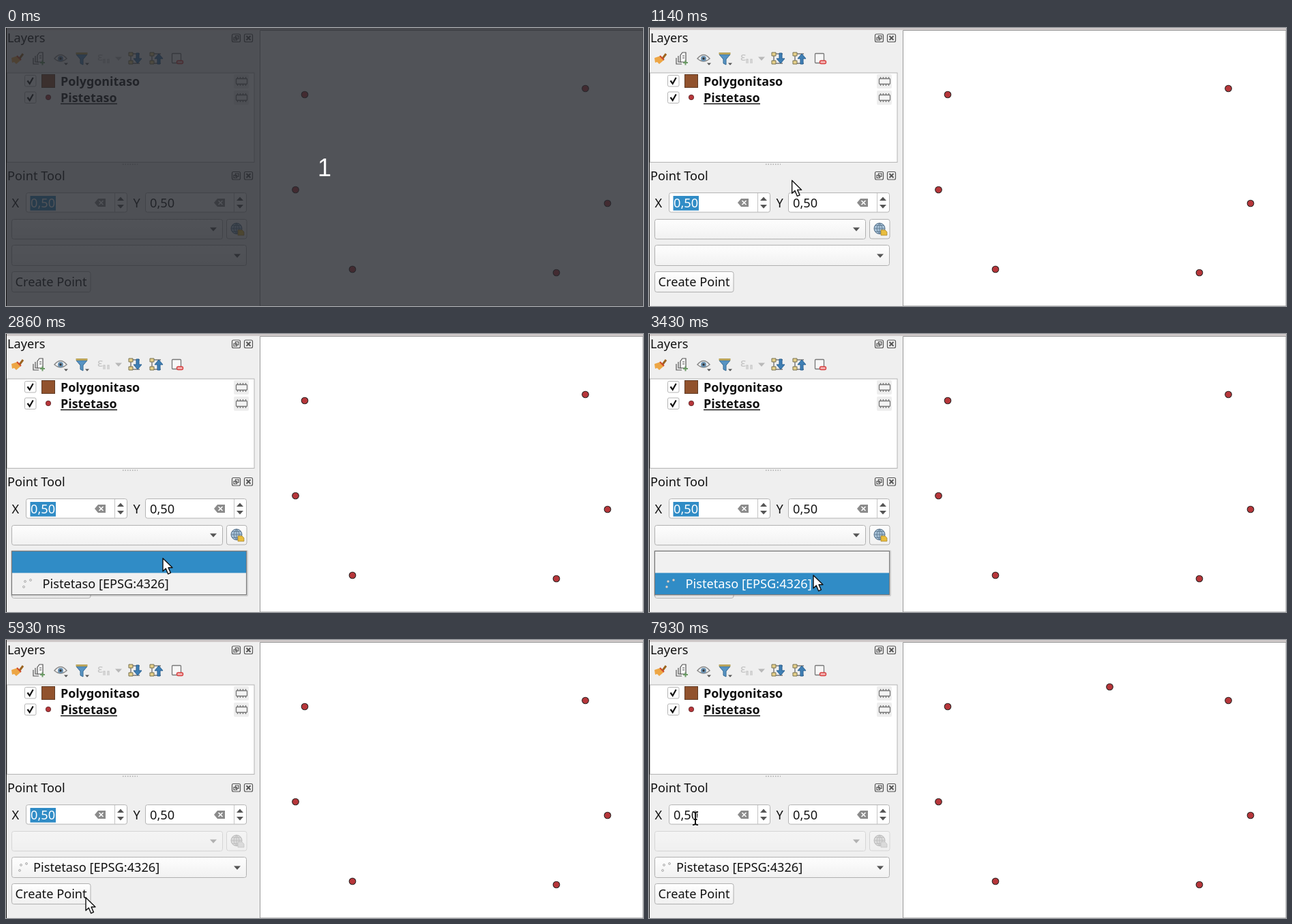
Write an HTML page that moves like this. It is 934x409 px and loops after 8 s.

```html
<!DOCTYPE html>
<html lang="fi">
<head>
<meta charset="utf-8">
<title>Point Tool</title>
<style>
  html, body { margin: 0; width: 100%; height: 100%; overflow: hidden; background: #efefef; }
  svg { display: block; width: 100%; height: 100%; }
  text { font: 18.2px "Noto Sans", sans-serif; fill: #111; }
  .bold { font-weight: 700; font-size: 17.9px; }
  .frame { fill: #fff; stroke: #b4b4b4; }
  .button { fill: url(#face); stroke: #b0b0b0; }
  .line { fill: none; stroke: #555; stroke-width: 1.2; }
  .arrow { fill: #555; }
  .disabled { opacity: .4; filter: grayscale(1); }
  .blue { fill: #308cc6; }
</style>
</head>
<body>
<svg viewBox="0 0 934 409" preserveAspectRatio="none">
  <defs>
    <linearGradient id="face" x2="0" y2="1">
      <stop stop-color="#fefefe"/><stop offset="1" stop-color="#f1f1f1"/>
    </linearGradient>
    <path id="down" class="arrow" d="M-5-2.5H5L0 3Z"/>
    <g id="dock" class="line">
      <rect x="331.5" y="9" width="12" height="11.5" rx="2"/>
      <path d="M336.5 11.5h4.5v4.5h-4.5zM334 14h4.5v4H334z"/>
      <rect x="349.5" y="9" width="12" height="11.5" rx="2"/>
      <path stroke-width="2" d="m352.5 11.8 6 6m0-6-6 6"/>
    </g>
    <g id="check">
      <rect class="frame" x="27.5" y="69.5" width="16.5" height="16.5" rx="2"/>
      <path d="m31.5 77.5 3.2 4.5 5-9" fill="none" stroke="#111" stroke-width="2.2"/>
    </g>
    <g id="memory">
      <rect x="334" y="68" width="22" height="21" rx="2" fill="#eee"/>
      <path d="M339.500 72v13m4-13v13m4-13v13m4-13v13" stroke="#777" stroke-width="1.3"/>
      <rect x="337.5" y="74.5" width="16" height="8" rx="1" fill="#f4f4f4" stroke="#777" stroke-width="1.3"/>
    </g>
    <g id="spin">
      <rect class="frame" x=".5" y="242.5" width="148" height="28.5" rx="3"/>
      <path d="M130.5 243v28" stroke="#c4c4c4"/>
      <path d="M101 257l5-6h11v12h-11z" fill="#8b8b8b"/>
      <path d="m107.5 254 6 6m0-6-6 6" stroke="#fff" stroke-width="1.5"/>
      <use href="#down" x="139" y="262.5"/>
      <use href="#down" transform="translate(139 251.5) scale(1 -1)"/>
    </g>
    <g id="points" fill="#e8e8e8" stroke="#aaa" stroke-width=".9">
      <circle cx="2" cy="12" r="1.5"/><circle cx="4" cy="4" r="1.5"/><circle cx="12" cy="2" r="1.5"/>
    </g>
    <g id="tree">
      <path d="M-5-7h12m-12 14h12M-6-4V4" fill="none" stroke="#777" stroke-width="1.4"/>
      <path d="M-9-9h6v5h-6zM-9 3h6v5h-6z" fill="#e6d08a" stroke="#77704f"/>
    </g>
    <path id="blueArrow" d="M1-8h4v8h4L3 7-3 0h4z" fill="#3f7fb4" stroke="#265f91"/>
    <path id="beamShape" d="M-4-9q4 0 4 2 0-2 4-2M0-7V8M-4 10q4 0 4-2 0 2 4 2M-2.5 2h5" fill="none"/>
  </defs>

  <rect width="934" height="409" fill="#efefef"/>
  <rect width="934" height="3" fill="#cfc9c9"/>
  <path d="M372.5 3.5H934V409H372.5z" fill="#fff" stroke="#999"/>
  <rect width="1" height="409" fill="#111"/>

  <text x="2" y="21.3">Layers</text>
  <use href="#dock"/>
  <text x="2" y="224">Point Tool</text>
  <use href="#dock" y="202.5"/>
  <path d="M171 200.5h22" stroke="#aaa" stroke-width="1.5" stroke-dasharray="1.5 2"/>

  <!-- Toolbar -->
  <g transform="translate(17 45)">
    <path d="m2 1 6-8" stroke="#9c6420" stroke-width="3"/>
    <path d="M-9-1 0-4l5 6-7 6-3-3-3 1z" fill="#eda645"/>
    <path d="m-1-4 6 6" stroke="#cf4a2b" stroke-width="2"/>
  </g>
  <g transform="translate(48 45)" class="line">
    <path d="M-8-1V8h8M-5-4v9h5"/>
    <path d="M-2-5 1-9h5V5h-8z" fill="#f7f7f7"/>
    <path d="M1-4h3m-3 3h3"/>
    <path d="M2 6h7M5.500 2.500v7" style="stroke:#6a9a64;stroke-width:2"/>
  </g>
  <g transform="translate(80 45)">
    <path d="M-9 0Q0-11 9 0 0 8-9 0Z" fill="#f6f6f6" stroke="#888" stroke-width="1.5"/>
    <circle r="4" fill="#6c93b3"/><circle r="1.7" fill="#333"/>
    <use href="#down" transform="translate(8 8) scale(.6)"/>
  </g>
  <g transform="translate(111 45)">
    <path d="M-8-6H8L2 1v8l-4-2V1z" fill="#5793c2" stroke="#356a94"/>
    <path d="M-8.500-7.500h17" stroke="#b9a45c" stroke-width="3"/>
    <use href="#down" transform="translate(8 8) scale(.6)"/>
  </g>
  <g opacity=".65">
    <text x="134" y="48" style="font-size:17px;fill:#aaa">ε</text>
    <path d="M145 52v-6h-2v6m6 0v-6h2v6" class="line" style="stroke:#aaa"/>
    <use href="#down" x="165" y="45" opacity=".55"/>
  </g>
  <use href="#tree" x="189" y="45"/><use href="#blueArrow" x="190" y="45"/>
  <use href="#tree" x="220" y="45"/><use href="#blueArrow" transform="translate(221 45) scale(1 -1)"/>
  <rect x="243.5" y="37.5" width="13" height="14" rx="1" fill="#f7f7f7" stroke="#777" stroke-width="1.3"/>
  <rect x="250.5" y="48" width="9" height="4.5" rx="2" fill="#f3b5b5" stroke="#d64040" stroke-width="1.4"/>

  <!-- Layer list -->
  <rect class="frame" x="1.5" y="66" width="362.5" height="131.5"/>
  <use href="#check"/><use href="#check" y="24.5"/>
  <rect x="52.5" y="68.5" width="19" height="19" fill="#91522d" stroke="#5f3a24"/>
  <circle cx="62" cy="102" r="3.7" fill="#b7363a" stroke="#552224" stroke-width=".8"/>
  <text class="bold" x="80" y="85.4">Polygonitaso</text>
  <text class="bold" x="80" y="109.2">Pistetaso</text>
  <path d="M80 111.5h83" stroke="#111" stroke-width="1.3"/>
  <use href="#memory"/><use href="#memory" y="24"/>

  <!-- Point form -->
  <text x="8.500" y="264">X</text><text x="186.500" y="264">Y</text>
  <use href="#spin" x="29"/><use href="#spin" x="204"/>
  <rect id="selection" class="blue" x="35.5" y="247" width="37.5" height="21.5"/>
  <text id="xValue" x="36" y="264">0,50</text>
  <text x="211" y="264">0,50</text>
  <g id="crs">
    <rect class="button" x="8.5" y="281.5" width="309" height="29" rx="3"/>
    <use href="#down" x="304" y="296"/>
    <rect class="button" x="323.5" y="281.5" width="29.5" height="28.5" rx="3"/>
    <circle cx="338" cy="295" r="8" fill="#a9c3d9" stroke="#56718a"/>
    <path d="M330 295h16m-14-4.5h12m-12 9h12m-6-12.5v16m0-16q-8 8 0 16m0-16q8 8 0 16" fill="none" stroke="#56718a" stroke-width=".8"/>
    <path d="M340 297h6l3 3v5h-9z" fill="#e9bd3e" stroke="#9b7d2b" stroke-width=".7"/>
  </g>
  <rect class="button" x="8.5" y="319.5" width="344" height="30" rx="3"/>
  <use href="#down" x="339" y="335"/>
  <g id="chosen">
    <use href="#points" x="18" y="327"/>
    <text x="40" y="341">Pistetaso [EPSG:4326]</text>
  </g>
  <rect id="create" class="button" x="8.5" y="358.5" width="115.5" height="30" rx="3"/>
  <text x="13.5" y="380">Create Point</text>

  <g id="popup">
    <rect x="7" y="318" width="348" height="68" rx="2" opacity=".15"/>
    <rect x="8.5" y="319.5" width="344" height="64" fill="#f1f1f1" stroke="#777"/>
    <rect id="highlight" class="blue" x="9" width="343" height="31.5"/>
    <use href="#points" x="24" y="360"/>
    <text id="option" x="53.5" y="374">Pistetaso [EPSG:4326]</text>
  </g>

  <g id="map" fill="#b7363a" stroke="#2b2323" stroke-width="1.1"></g>

  <g id="pointer">
    <path id="hand" d="M1 1v19l4.3-4 3.3 8 3.8-1.6L9 14.8h6z" fill="#fff" stroke="#111" stroke-width="1.4" stroke-linejoin="round"/>
    <g id="beam">
      <use href="#beamShape" stroke="#fff" stroke-width="4"/>
      <use href="#beamShape" stroke="#111" stroke-width="2"/>
    </g>
  </g>

  <g id="countdown">
    <rect x="1" width="933" height="409" fill="#26292f" opacity=".8"/>
    <text x="457" y="218" style="font:36px 'Liberation Sans',sans-serif;fill:#fff">1</text>
  </g>
</svg>
<script>
const LOOP = 8000, FPS = 14;
const el = id => document.getElementById(id);
const show = (id, on) => el(id).style.display = on ? '' : 'none';

// Pointer path as [step, x, y]
const path = [
  [9, 287, 395], [12, 250, 260], [15, 203, 190], [18, 220, 290], [20, 230, 324],
  [22, 230, 331], [39, 230, 331], [40, 229, 329], [44, 229, 329], [48, 240, 354],
  [49, 242, 358], [52, 242, 358], [55, 244, 363], [75, 244, 363], [80, 170, 372],
  [83, 116, 378], [87, 75, 372], [105, 75, 372], [109, 68, 275], [111, 68, 262]
];

const points = [[438, 98], [849.5, 89], [424.5, 238], [882, 258], [508, 355], [807, 360], [675.5, 69]];
el('map').innerHTML = points.map(([x, y]) => `<circle cx="${x}" cy="${y}" r="4.8"/>`).join('');
const newPoint = el('map').lastChild;

function pointerAt(step) {
  const i = path.findIndex(key => key[0] >= step);
  if (i < 1) return path[0].slice(1);
  const [s0, x0, y0] = path[i - 1], [s1, x1, y1] = path[i];
  const p = (step - s0) / (s1 - s0);
  return [x0 + (x1 - x0) * p, y0 + (y1 - y0) * p];
}

function draw(time) {
  const step = Math.min(111, Math.floor((time % LOOP + 5) * FPS / 1000));
  const [x, y] = pointerAt(step);
  const picked = step >= 64, onOption = step >= 48, editing = step < 99;
  const overField = step > 106 && y < 272;

  show('countdown', step < 1);
  show('pointer', step >= 9);
  show('hand', !overField);
  show('beam', overField);
  el('pointer').setAttribute('transform', `translate(${x} ${y})`);

  show('popup', step >= 26 && !picked);
  el('highlight').setAttribute('y', onOption ? 351.5 : 320);
  el('option').style.fill = onOption ? '#fff' : '';

  show('chosen', picked);
  el('crs').classList.toggle('disabled', picked);
  show('selection', editing);
  el('xValue').style.fill = editing ? '#fff' : '';
  el('create').style.fill = step >= 99 && step < 101 ? '#d9d9d9' : '';
  newPoint.style.display = step >= 100 ? '' : 'none';
}

function tick() {
  draw(performance.now());
  requestAnimationFrame(tick);
}
tick();
</script>
</body>
</html>
```
